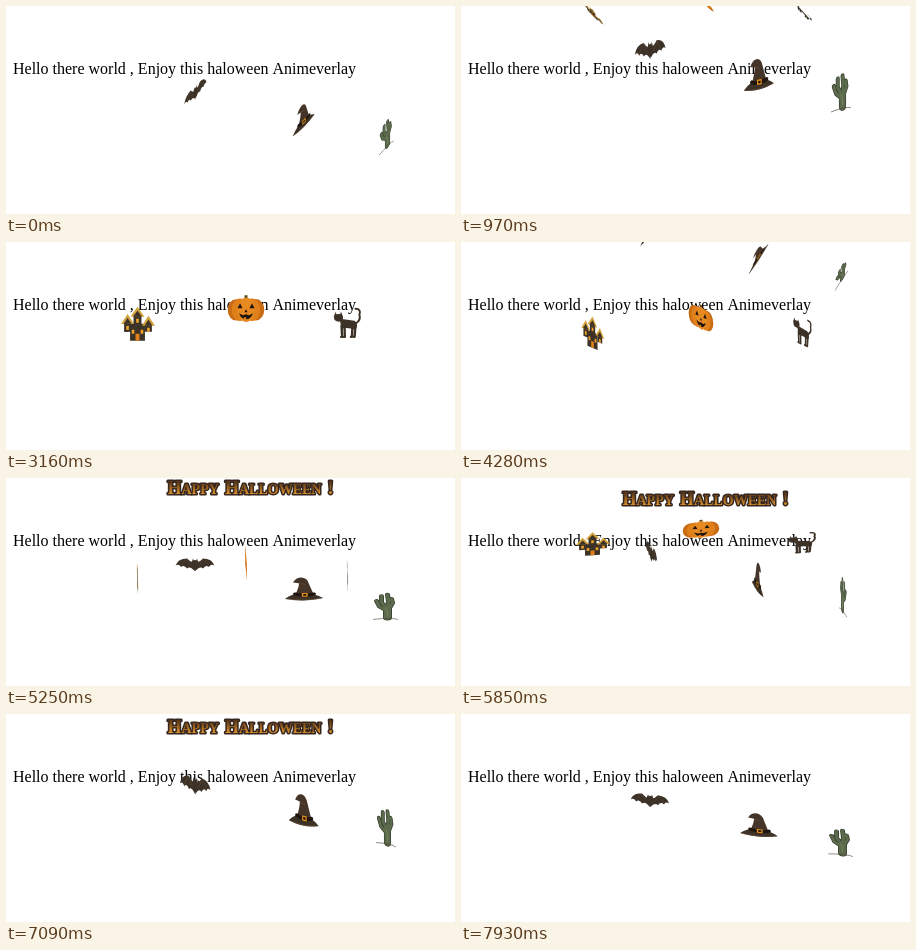
Write an HTML page with a canvas that moves like this. It is 449 px wide and 208 px high and loops after 8000 ms.

```html
<!DOCTYPE html>
<html lang="en">
<head>
<meta charset="utf-8">
<title>Halloween overlay</title>
<style>
  html, body { margin: 0; width: 100%; height: 100%; overflow: hidden; background: #fff; }
  p { position: absolute; left: 7px; top: 54px; margin: 0; white-space: nowrap;
      font: 16px/18px "Liberation Serif", serif; font-kerning: none; color: #000; }
  canvas { position: absolute; left: 0; top: 0; }
</style>
</head>
<body>
<p>Hello there world , Enjoy this haloween Animeverlay</p>
<canvas id="stage" width="449" height="208"></canvas>
<script>
const LOOP = 8000, TAU = 2 * Math.PI;
const ctx = document.getElementById('stage').getContext('2d');
const DARK = '#3d3227', GOLD = '#d0a03a', ORANGE = '#e0801a', BLACK = '#20150e';
const GREEN = '#5d6b4d', MOSS = '#343d2d';

function fill(path, color) {
  ctx.fillStyle = color;
  ctx.fill(new Path2D(path));
}

function line(path, color, width) {
  ctx.strokeStyle = color;
  ctx.lineWidth = width;
  ctx.stroke(new Path2D(path));
}

function oval(x, y, rx, ry, color) {
  ctx.fillStyle = color;
  ctx.beginPath();
  ctx.ellipse(x, y, rx, ry, 0, 0, TAU);
  ctx.fill();
}

const box = (x, y, w, h, color) => fill(`M${x - w / 2} ${y} h${w} v${h} h${-w} Z`, color);
const peak = (x, base, w, h, color) => fill(`M${x - w / 2} ${base} h${w} l${-w / 2} ${-h} Z`, color);

function bat() {
  oval(0, 0, 3.2, 7, DARK);
  for (const side of [1, -1]) {
    ctx.save();
    ctx.scale(side, 1);
    fill('M1-3 Q5-4 8-9 Q17-9 19.5 1 Q16-2 14 3 Q11-1 8 5 Q5 1 0 9 Z', DARK);
    peak(2, -3, 3, 6, DARK);
    line('M4 1 L9-8 L14 1', '#5d4d3b', 0.5);
    ctx.restore();
  }
}

function hat() {
  fill('M-19 14 Q-10 5 0 6 Q11 6 19 13 Q0 19-19 14 Z', DARK);
  fill('M-9 9 Q-5-2-5-8 L-11-9 Q-8-16-3-16 Q3-16 5-7 L10 9 Z', '#453529');
  line('M-9 7 Q0 11 10 7', BLACK, 4);
  line('M-5-8 L1-6 M-18 14 Q0 18 18 13', '#66503a', 0.7);
  line('M-1.5 6.5 h4.5 v4 h-4.5 Z', '#e8921c', 1.4);
}

function hand() {
  const limbs = 'M2 16 L1 2 M0 2 L-4-5 L-4-14 M2 1 L3-6 L2-16 M-1 5 L-6 1 L-9-7 M4 3 L7-4 L6-10';
  line(limbs, MOSS, 5);
  line('M2 3 V16', MOSS, 9);
  line(limbs, GREEN, 3.4);
  line('M2 3 V16', GREEN, 7.4);
  line('M0 3 L2 8 V14', '#7f8b69', 0.8);
  line('M-12 19 L-4 18 L9 18 L12 19', '#4a4438', 0.7);
}

function tower(x, y, w, h) {
  box(x, y, w, h, DARK);
  peak(x, y + 1, w + 6, 10, GOLD);
  peak(x, y + 1, w + 1, 6, DARK);
  box(x, y + 3, 2.6, 4, '#f0a52a');
}

function house() {
  box(0, 0, 15, 17, DARK);
  tower(-10, -1, 7, 9);
  tower(11, 1, 7, 7);
  tower(0, -8, 8, 12);
  for (const x of [-4.5, 4.5]) box(x, 6, 2.6, 4, '#f0a52a');
  box(0, 10, 4, 7, ORANGE);
}

function pumpkin() {
  box(0, -14, 3, 5, '#5b4a22');
  for (const x of [10, 6, 0]) {
    const shade = x === 10 ? '#c96b12' : x ? ORANGE : '#e88a22';
    for (const side of [1, -1]) oval(x * side, 0.5, 8.4, 12 - x / 8, shade);
  }
  for (const x of [-6, 6]) peak(x, -1, 5, 5, BLACK);
  peak(0, 3, 3, 3, BLACK);
  fill('M-7 4 L-3 6 L0 5 L3 6 L7 4 Q5 10 0 10 Q-5 10-7 4 Z', BLACK);
  box(-1, 8, 2.4, 2.4, ORANGE);
}

function cat() {
  fill('M-8-4 Q0-3 7-2 Q12 1 8 7 Q0 4-6 6 Z', DARK);
  for (const x of [-6, -3, 5, 8]) line(`M${x} 3 L${x * 0.9} 14 h-1`, DARK, 2.4);
  oval(-9, -5, 4.6, 3.8, DARK);
  for (const x of [-12, -6.5]) peak(x, -6, 4, 5, DARK);
  line('M8 1 Q14-3 12-8 Q14-14 8-14', DARK, 2);
}

// name, x, y and the offset of the drawing from its axis
const flyers = [[bat, 190, 63, -1], [hat, 297, 87, 1], [hand, 381.5, 104, -2]];
const scenery = [[house, 131.5, 81, 0], [pumpkin, 240, 66.5, 0], [cat, 341.5, 80, 0]];

const airSwing = { high: 6530, period: 2680, sink: 12 };
const landSwing = { high: 3400, period: 3480, sink: 9 };

// Each flight drops in until arrive and rises away after leave
const flights = [
  { icons: flyers, swing: airSwing, arrive: 0, leave: 450, turn: t => -55 + 0.389 * t },
  { icons: scenery, swing: landSwing, arrive: 1770, leave: 5250,
    turn: t => spin(t - 3160, -7, 0.348, 2e-5) },
  { icons: flyers, swing: airSwing, arrive: 5050, leave: LOOP,
    turn: t => spin(t - 5250, 0, 0.425, -7e-6) }
];

const spin = (s, angle, speed, gain) => angle + s * (speed + gain * s);
const rad = deg => deg * TAU / 360;

function drawFlight({ icons, swing, arrive, leave, turn }, t) {
  const drop = 80 * (Math.max(0, arrive - t) / 770) ** 2;
  const rise = 70 * (Math.max(0, t - leave) / 970) ** 2;
  const away = drop + rise;
  if (away > 150) return;

  const sway = 1 - Math.cos(TAU * (t - swing.high) / swing.period);
  const tilt = rad(Math.min(80, 22.5 * sway + 0.7 * away));
  const angle = rad(turn(t));
  for (const [icon, x, y, shift] of icons) {
    ctx.save();
    ctx.transform(Math.cos(angle), Math.sin(angle) * Math.sin(tilt), 0, Math.cos(tilt),
                  x, y + swing.sink * sway - away);
    ctx.translate(shift, 0);
    icon();
    ctx.restore();
  }
}

function drawWord(first, rest, x, y) {
  const glow = ctx.createLinearGradient(0, y - 12, 0, y);
  glow.addColorStop(0, '#5a3518');
  glow.addColorStop(1, '#dd922c');
  for (const [text, size] of [[first, 18], [rest, 14]]) {
    ctx.font = `bold ${size}px "Liberation Serif", serif`;
    ctx.strokeStyle = '#35261f';
    ctx.lineWidth = 3;
    ctx.strokeText(text, x, y);
    ctx.fillStyle = glow;
    ctx.fillText(text, x, y);
    x += ctx.measureText(text).width;
  }
}

function drawTitle(t) {
  const phase = (t - 4880) / 2680;
  if (phase < 0 || phase > 1) return;
  const y = 37 * Math.sqrt(Math.sin(Math.PI * phase)) - 8;
  drawWord('H', 'APPY', 161.5, y);
  drawWord('H', 'ALLOWEEN', 219, y);
  drawWord('!', '', 321.5, y);
}

function frame(now) {
  const t = (now - start) % LOOP;
  ctx.clearRect(0, 0, 449, 208);
  ctx.lineJoin = ctx.lineCap = 'round';
  drawTitle(t);
  for (const flight of flights) drawFlight(flight, t);
  requestAnimationFrame(frame);
}

let start;
requestAnimationFrame(now => {
  start = now;
  frame(now);
});
</script>
</body>
</html>
```
